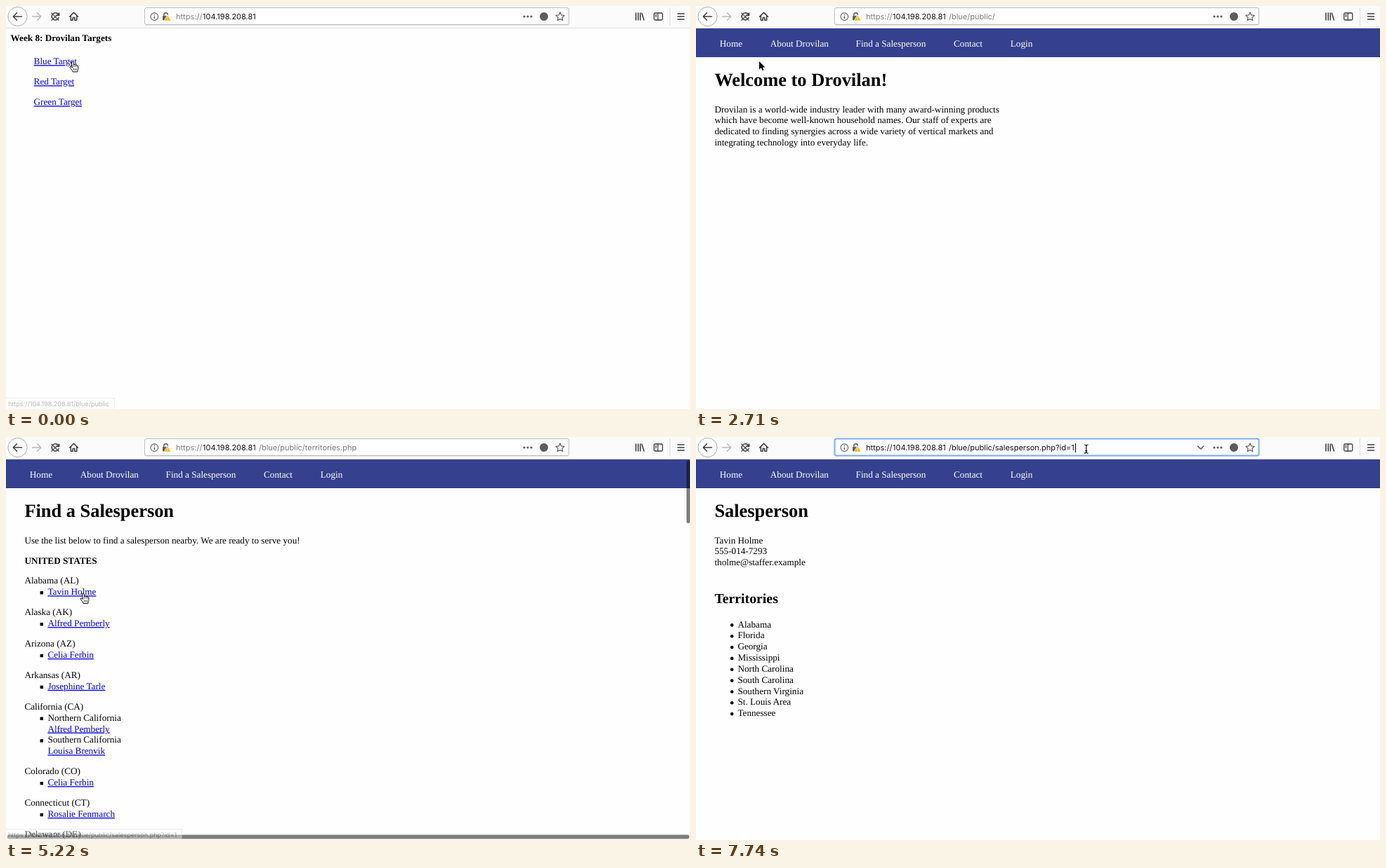
Write an HTML page that moves like this. It is 974 px wide and 575 px high and loops after 8 s.

```html
<!DOCTYPE html>
<html lang="en">
<head>
<meta charset="utf-8">
<title>Browser walkthrough</title>
<style>
html, body { margin: 0; width: 100%; height: 100%; overflow: hidden; background: #fff; }
svg { display: block; width: 974px; height: 575px; }
text { white-space: pre; text-rendering: geometricPrecision; }
.page text { font: 13.2px "Liberation Serif", "Times New Roman", serif; fill: #000; }
.page .b { font-weight: bold; }
.page .h1 { font-weight: bold; font-size: 26.4px; }
.page .h2 { font-weight: bold; font-size: 19.8px; }
.page .a { fill: #00e; text-decoration: underline; }
.page .nav { fill: #fff; }
.ui text { font: 11px Inter, "Open Sans", sans-serif; }
#status text { font-size: 9.05px; fill: #3c3c3c; }
.ln { fill: none; stroke: #3b3b3d; stroke-width: 1.5; stroke-linecap: round; stroke-linejoin: round; }
</style>
</head>
<body>
<svg viewBox="0 0 974 575">
  <rect width="974" height="575" fill="#fefefe"/>
  <g id="index" class="page"></g>
  <g id="site" class="page">
    <rect y="32" width="974" height="41" fill="#35418e"/>
    <path d="M0 72.5H974M.5 32V73" stroke="#2c3885" fill="none"/>
    <g id="nav"></g>
  </g>
  <g id="home" class="page"></g>
  <g id="list" class="page"></g>
  <g id="person" class="page"></g>

  <rect id="hbar" x="1.5" y="567.5" width="971.5" height="6" rx="3" opacity=".5"/>
  <rect id="vbar" x="969" y="33.5" width="5" height="89.5" rx="2.5" opacity=".5"/>

  <g id="status" class="ui">
    <rect id="statusBox" x="-1" y="559.5" height="17" fill="#fbfbfb" stroke="#cfcfcf"/>
    <text id="statusText" x="3" y="571"></text>
  </g>

  <g class="ui">
    <rect width="974" height="32" fill="#fbfbfb"/>
    <path d="M0 31.5H974" stroke="#dedede"/>
    <circle cx="16.5" cy="15" r="13.6" fill="#fff" stroke="#adadad"/>
    <path class="ln" d="M22.5 15H10.5M15.5 9.8L10.3 15L15.5 20.2"/>
    <path class="ln" style="stroke:#b9b9bb" d="M37.5 15H49.5M44.5 9.8L49.7 15L44.5 20.2"/>
    <g id="reload">
      <path class="ln" d="M74.6 12.2A5.1 5.1 0 1 0 75 16.8"/>
      <path d="M76.3 9.2V14.3H71.2Z" fill="#3b3b3d"/>
    </g>
    <path id="stop" class="ln"/>
    <path class="ln" d="M90.5 15.2L96.5 9.4L102.5 15.2M92.3 14.5V20.2H95.2V16.6H97.8V20.2H100.7V14.5"/>

    <rect x="197" y="3.5" width="605" height="24.5" rx="3" fill="#e6e6e6"/>
    <rect id="field" x="197.5" y="2.5" width="604" height="24" rx="2.5" fill="#fff"/>
    <circle cx="211.3" cy="15.2" r="5.3" fill="none" stroke="#5c5c5e" stroke-width="1.1"/>
    <path d="M211.3 14.4V18" stroke="#5c5c5e" stroke-width="1.4"/>
    <circle cx="211.3" cy="12.5" r=".8" fill="#5c5c5e"/>
    <path d="M224.8 14.5V12.5A2.8 2.8 0 0 1 230.4 12.5V14.5" fill="none" stroke="#5c5c5e" stroke-width="1.4"/>
    <rect x="223" y="14" width="8" height="6.6" rx="1" fill="#5c5c5e"/>
    <path d="M230 12.4L235 21.2H225Z" fill="#f7b500" stroke="#fff" stroke-width=".8" stroke-linejoin="round"/>
    <path d="M230 15.4V18.2M230 19.1V20.2" stroke="#fff" stroke-width="1.1"/>
    <rect id="pick" x="242" y="8" width="298.5" height="14" fill="#b3d7ff"/>
    <text id="scheme" x="242" y="19.3">https://</text>
    <text x="280" y="19.3" fill="#111">104.198.208.81</text>
    <text id="path" x="360" y="19.3"></text>
    <path id="caret" d="M540.5 9V22" stroke="#000"/>
    <path id="chevron" class="ln" style="stroke:#5c5c5e" d="M714.6 13L718.8 17.2L723 13"/>
    <g fill="#5c5c5e">
      <circle cx="738" cy="15" r="1.6"/><circle cx="743" cy="15" r="1.6"/><circle cx="748" cy="15" r="1.6"/>
      <circle cx="766" cy="15" r="6"/>
    </g>
    <path id="star" class="ln" style="stroke:#5c5c5e;stroke-width:1.2"/>
    <path class="ln" d="M897 10V20M900.3 10V20M903.3 10V20M905.4 10.3L908.4 20"/>
    <rect class="ln" x="922.8" y="10" width="12" height="10" rx="1.5" style="stroke-width:1.3"/>
    <path class="ln" style="stroke-width:1.2" d="M928.3 10V20M924.6 12.8H926.4M924.6 15H926.4"/>
    <path d="M945.5 2V28" stroke="#dcdcdc"/>
    <path class="ln" d="M956.5 11H965.5M956.5 15H965.5M956.5 19H965.5"/>
  </g>

  <g id="arrow">
    <path d="M0 0V11.6L2.7 9.1L4.5 13.2L6.5 12.3L4.7 8.4H8.4Z" stroke="#fff" stroke-width="1.6" stroke-linejoin="round" paint-order="stroke"/>
  </g>
  <g id="hand">
    <path d="M-1.6 1.4C-1.6 .2 .9 .2 1 1.4L1.6 5.2C1.8 4.2 3.8 4.3 4 5.4C4.4 4.6 5.9 4.9 6.1 6C6.7 5.5 7.8 6 7.8 7.2V10.2C7.8 11.6 6.9 12.4 6.8 14.9H.1C-.2 12.8 -1.9 11.6 -3.7 9.2C-4.7 7.7 -3.1 6.7 -1.9 7.8L-.6 9Z"
      fill="#fff" stroke="#000" stroke-width="1" stroke-linejoin="round"/>
    <path d="M1.7 5.4V8M4 5.7V8M6.1 6.3V8.2M1.4 10V12.8M3.4 10V12.8M5.3 10V12.8" stroke="#000" stroke-width=".7" fill="none"/>
  </g>
  <g id="beam" fill="none" stroke="#000" stroke-width="1.2">
    <path d="M-2.8 -6Q0 -6 0 -4.4Q0 -6 2.8 -6M0 -4.6V4.8M-2.8 6.2Q0 6.2 0 4.6Q0 6.2 2.8 6.2M-1.5 2.6H1.5"/>
  </g>
</svg>
<script>
const LOOP = 8000, LINE = 15.84, GAP = 13.2, LEFT = 26.4, INDENT = 59.4;
const $ = id => document.getElementById(id);

function add(parent, tag, attrs, text) {
  const el = document.createElementNS("http://www.w3.org/2000/svg", tag);
  for (const k in attrs) el.setAttribute(k, attrs[k]);
  if (text) el.textContent = text;
  $(parent).appendChild(el);
}
const put = (parent, x, y, text, cls = "") => add(parent, "text", { x, y, class: cls }, text);

// Landing page
put("index", 6.6, 50, "Week 8: Drovilan Targets", "b");
["Blue", "Red", "Green"].forEach((c, i) => put("index", 39.6, 83.2 + i * 29.04, c + " Target", "a"));

// Shared navigation
[[33.8, "Home"], [105.8, "About Drovilan"], [227.6, "Find a Salesperson"], [367, "Contact"], [447.8, "Login"]]
  .forEach(([x, s]) => put("nav", x, 57.6, s, "nav"));

// Welcome page
put("home", LEFT, 113.8, "Welcome to Drovilan!", "h1");
["Drovilan is a world-wide industry leader with many award-winning products",
 "which have become well-known household names. Our staff of experts are",
 "dedicated to finding synergies across a wide variety of vertical markets and",
 "integrating technology into everyday life."]
  .forEach((s, i) => put("home", LEFT, 151.6 + i * LINE, s));

// Territory list; entries are "area|person" or just "person"
put("list", LEFT, 113.8, "Find a Salesperson", "h1");
put("list", LEFT, 151.6, "Use the list below to find a salesperson nearby. We are ready to serve you!");
put("list", LEFT, 180.5, "UNITED STATES", "b");
let y = 209.4;
[["Alabama (AL)", "Tavin Holme"],
 ["Alaska (AK)", "Alfred Pemberly"],
 ["Arizona (AZ)", "Celia Ferbin"],
 ["Arkansas (AR)", "Josephine Tarle"],
 ["California (CA)", "Northern California|Alfred Pemberly", "Southern California|Louisa Brenvik"],
 ["Colorado (CO)", "Celia Ferbin"],
 ["Connecticut (CT)", "Rosalie Fenmarch"],
 ["Delaware (DE)"]].forEach(([state, ...people]) => {
  put("list", LEFT, y, state);
  for (const entry of people) {
    const parts = entry.split("|");
    add("list", "rect", { x: 48.6, y: y + LINE - 5.2, width: 4.4, height: 4.4 });
    parts.forEach((s, i) => put("list", INDENT, y += LINE, s, i === parts.length - 1 ? "a" : ""));
  }
  y += LINE + GAP;
});

// Salesperson page
put("person", LEFT, 113.8, "Salesperson", "h1");
["Tavin Holme", "555-014-7293", "tholme@staffer.example"]
  .forEach((s, i) => put("person", LEFT, 151.6 + i * LINE, s));
put("person", LEFT, 237, "Territories", "h2");
["Alabama", "Florida", "Georgia", "Mississippi", "North Carolina", "South Carolina",
 "Southern Virginia", "St. Louis Area", "Tennessee"].forEach((s, i) => {
  const base = 271.6 + i * LINE;
  add("person", "circle", { cx: 51.2, cy: base - 3.2, r: 2.3 });
  put("person", INDENT, base, s);
});

$("star").setAttribute("d", "M" + Array.from({ length: 10 }, (_, i) => {
  const r = i % 2 ? 3 : 6.4, a = (i - 2.5) * Math.PI / 5;
  return (789 + r * Math.cos(a)).toFixed(2) + " " + (15.4 + r * Math.sin(a)).toFixed(2);
}).join("L") + "Z");

// Timelines: each value holds until the next step
const pages = [[0, "index"], [1790, "home"], [3900, "list"], [5810, "person"]];
const paths = {
  index: "",
  home: "/blue/public/",
  list: "/blue/public/territories.php",
  person: "/blue/public/salesperson.php?id=1"
};
const hints = [
  [0, "/blue/public", .35, 155], [150, "/blue/public", .7, 155], [290, "/blue/public", 1, 155], [1790, "", 0, 0],
  [3310, paths.list, .4, 219], [3460, paths.list, 1, 219], [4630, paths.list, .5, 219], [4780, "", 0, 0],
  [5220, paths.person, .4, 251], [5370, paths.person, 1, 251], [5810, "", 0, 0]];
const bars = [[0, 0], [1790, 1], [2400, .5], [2560, 0], [3900, 1], [5370, .5], [5520, 0], [5810, 1], [6550, .5], [6700, 0]];
const buttons = [[0, "reload"], [1640, "stop"], [1940, "idle"], [2710, "reload"], [3760, "morph"], [3900, "stop"],
  [4340, "reload"], [5660, "morph"], [5810, "stop"], [6110, "reload"]];
const pointer = [
  [0, "hand", 95, 79], [150, "hand", 89, 80], [290, "hand", 82, 80], [440, "hand", 79, 80], [1790, "arrow", 79, 79],
  [2710, "arrow", 90, 79], [2860, "arrow", 140, 76], [3010, "arrow", 215, 77], [3160, "hand", 284, 58],
  [3310, "hand", 296, 53], [3460, "hand", 276, 50], [3610, "arrow", 269.5, 49],
  [4050, "arrow", 268, 55], [4200, "arrow", 250, 90], [4340, "arrow", 222, 135], [4490, "arrow", 198, 161],
  [4630, "arrow", 178, 181], [4780, "arrow", 155, 200], [4930, "arrow", 134, 213], [5080, "hand", 114, 221],
  [5220, "hand", 110, 222.5], [5810, "arrow", 110, 222], [5960, "arrow", 150, 207], [6110, "arrow", 330, 146],
  [6250, "arrow", 514.5, 88], [6400, "arrow", 556, 50], [6550, "beam", 568, 23], [6700, "beam", 569, 18],
  [7290, "beam", 562, 17], [7440, "beam", 555.7, 17]];
const HOVER = 6550, FOCUS = 6850, PLACE = 7740;

const cross = "M65 10.2L75 20.2M75 10.2L65 20.2";
const half = "M64.5 9.7L75 20.2M69 16.2L65 20.2";

const at = (track, t) => track.filter(s => s[0] <= t).pop();
const show = (id, on) => { $(id).style.display = on ? "" : "none"; };
const set = (id, attrs) => { for (const k in attrs) $(id).setAttribute(k, attrs[k]); };

function draw(t) {
  const page = at(pages, t)[1];
  for (const [, id] of pages) show(id, id === page);
  show("site", page !== "index");

  const button = at(buttons, t)[1];
  show("reload", button === "reload");
  show("stop", button !== "reload");
  set("stop", { d: button === "morph" ? half : cross, style: "stroke:" + (button === "idle" ? "#bdbdbf" : "#5a5a5c") });

  const focus = t >= FOCUS, ink = focus ? "#111" : "#7b7b7d";
  $("path").textContent = paths[page];
  set("path", { fill: ink });
  set("scheme", { fill: ink });
  set("field", { stroke: focus ? "#7fabf3" : "#bcbcbc", "stroke-width": focus ? 2 : 1 });
  show("pick", focus && t < PLACE);
  show("caret", t >= PLACE);
  show("chevron", t >= HOVER);

  const bar = at(bars, t)[1];
  set("hbar", { opacity: bar / 2 });
  set("vbar", { opacity: page === "list" ? bar / 2 : 0 });

  const [, hint, alpha, width] = at(hints, t);
  $("statusText").textContent = "https://104.198.208.81" + hint;
  set("statusBox", { width: width + .5 });
  set("status", { opacity: alpha });

  const [, kind, x, y] = at(pointer, t);
  for (const id of ["arrow", "hand", "beam"]) show(id, id === kind);
  set(kind, { transform: `translate(${x} ${y})` });
}

const start = performance.now();
function tick() {
  draw((performance.now() - start) % LOOP);
  requestAnimationFrame(tick);
}
tick();
</script>
</body>
</html>
```
